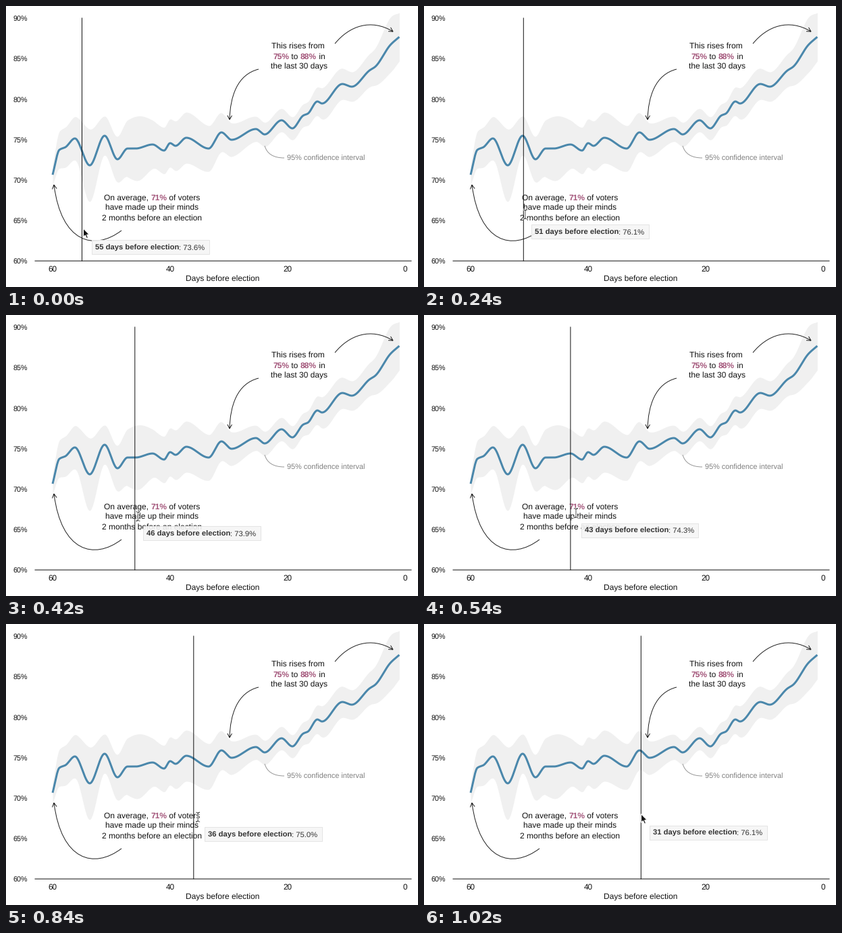
Animation of 610 by 418 pixels, one loop 1.15 s. Source, as a matplotlib script:

```python
import matplotlib.pyplot as plt
import numpy as np
from matplotlib.animation import FuncAnimation
from matplotlib.patches import PathPatch, Polygon, Rectangle
from matplotlib.path import Path

W, H, DPI = 610, 418, 64
PT = 72 / DPI  # points per pixel
LOOP, TICK, STEP, LAST = 1150, 10, 60, 17

INK, BLUE, PLUM, GREY = "#111111", "#4a87ab", "#a3557a", "#808080"

plt.rcParams.update({
    "font.family": "Liberation Sans",
    "text.hinting": "none",
    "toolbar": "None",
})

fig = plt.figure(figsize=(W / DPI, H / DPI), dpi=DPI, facecolor="white")
ax = fig.add_axes([0, 0, 1, 1])
ax.set(xlim=(0, W), ylim=(H, 0))
ax.axis("off")


def day_x(day):
    return 69 + (60 - day) * 8.7


def x_day(x):
    return round(60 - (x - 69) / 8.7)


def pct_y(pct):
    return 379.5 - (pct - 60) * 12.03


def smooth(points, u):
    """Monotone cubic through the points: flat at every turning point."""
    x, y = np.array(points, float).T
    h = np.diff(x)
    d = np.diff(y) / h
    prod = d[:-1] * d[1:]
    inner = np.divide(2 * prod, d[:-1] + d[1:], out=np.zeros_like(prod), where=prod > 0)
    m = np.concatenate([d[:1], inner, d[-1:]])
    i = np.clip(np.searchsorted(x, u, side="right") - 1, 0, len(h) - 1)
    t, h = (u - x[i]) / h[i], h[i]
    return ((1 + 2 * t) * (1 - t) ** 2 * y[i] + t * (1 - t) ** 2 * h * m[i]
            + t * t * (3 - 2 * t) * y[i + 1] + t * t * (t - 1) * h * m[i + 1])


def text(x, y, s, size=12, color=INK, weight="normal", ha="left", z=6):
    return ax.text(x, y, s, fontsize=size * PT, color=color, weight=weight,
                   ha=ha, va="baseline", zorder=z)


def chain(parts, x):
    """Set the parts one after another from x; return the end."""
    for part in parts:
        part.set_x(x)
        x += part.get_window_extent().width
    return x


def rich(cx, y, *parts):
    """Centred line; parts ending in % are highlighted."""
    items = [text(0, y, p, color=PLUM, weight="bold") if p.endswith("%")
             else text(0, y, p) for p in parts]
    chain(items, cx - chain(items, 0) / 2)


def stroke(points, color="#222222", head=0):
    codes = [Path.MOVETO] + [Path.CURVE4 if len(points) == 4 else Path.CURVE3] * (len(points) - 1)
    verts = list(points)
    if head:
        tip = np.array(points[-1], float)
        back = np.array(points[-2], float) - tip
        a = np.arctan2(back[1], back[0])
        wings = [tip + head * np.array([np.cos(a + s), np.sin(a + s)]) for s in (-0.5, 0.5)]
        verts += [wings[0], tip, wings[1]]
        codes += [Path.MOVETO, Path.LINETO, Path.LINETO]
    ax.add_patch(PathPatch(Path(verts, codes), fc="none", ec=color, lw=PT, zorder=5))


# Average line by its turning points, with a symmetric confidence band
turns = [(69, 251), (79, 214), (88, 210), (102, 197), (124, 237), (146, 193),
         (165, 228), (180, 212), (192, 212), (217, 206), (234, 215), (243, 204),
         (251, 208), (267, 196), (300, 212), (319, 188), (334, 199), (370, 183),
         (383, 191), (408, 170), (424, 182), (440, 163), (447, 160), (461, 142),
         (468, 145), (498, 116), (512, 120), (538, 96), (547, 90), (569, 58), (582.3, 46)]
margin = [(69, 15), (80, 28), (104, 33), (123, 54), (146, 29), (165, 34), (195, 48),
          (224, 34), (265, 38), (300, 34), (334, 25), (380, 18), (440, 17),
          (480, 25), (512, 22), (540, 25), (570, 41), (582.3, 36)]
xs = np.linspace(69, 582.3, 700)
mean, half = smooth(turns, xs), smooth(margin, xs)
ax.fill_between(xs, mean - half, mean + half, color="#f0f0f0", lw=0, zorder=1)
ax.plot(xs, mean, color=BLUE, lw=3 * PT, solid_capstyle="butt", zorder=3)

# Axes
ax.plot([43, 600], [379.2, 379.2], color=INK, lw=PT, snap=False, zorder=2)
for p in range(60, 91, 5):
    text(32, pct_y(p) + 3.5, f"{p}%", 10.8, ha="right")
for d in range(0, 61, 20):
    text(day_x(d), 395, str(d), 11.8, ha="center")
text(321, 410, "Days before election", ha="center")

# Notes
rich(434, 63, "This rises from ")
rich(434, 79, "75%", " to ", "88%", " in")
rich(434, 94, "the last 30 days")
rich(216, 289, "On average, ", "71%", " of voters")
rich(216, 304, "have made up their minds")
rich(216, 319, "2 months before an election")
text(416.5, 229.5, "95% confidence interval", 10.9, GREY)
stroke([(487, 56), (508, 30), (540, 18), (573, 38)], head=7)
stroke([(374, 94), (342, 102), (332, 135), (331, 169)], head=7)
stroke([(171, 334), (130, 365), (82, 352), (71, 266)], head=7)
stroke([(383, 208), (388, 226), (412, 226)], "#999999")

# Hover rule, tooltip and pointer
shares = [73.6, 71.5, 72.0, 74.8, 76.1, 74.0, 73.9, 73.9, 74.0,
          74.3, 74.4, 75.2, 74.0, 75.3, 75.0, 73.9, 73.9, 76.1]

rule, = ax.plot([0, 0], [18, 379], color=INK, lw=PT, snap=False, zorder=7)
box = Rectangle((0, 0), 172, 21, fc=(0.96, 0.96, 0.96, 0.9), ec="#e4e4e4", lw=PT, zorder=8)
ax.add_patch(box)
tip = [text(0, 0, "", 11.3, "#333333", w, z=9) for w in ("bold", "normal")]

ARROW = np.array([(0, 0), (0, 12.5), (2.8, 9.9), (5, 14.6), (7, 13.7), (5, 9.2), (8.8, 9)])
arrow = Polygon(ARROW, fc="#111111", ec="white", lw=PT, zorder=11)
ax.add_patch(arrow)
BEAM = np.array([(-2.5, -7), (0, -6), (2.5, -7), (0, -6), (0, 6), (-2.5, 7), (0, 6), (2.5, 7)])
beam = [ax.plot([], [], color=c, lw=w * PT, alpha=a, zorder=z)[0]
        for c, w, a, z in (("white", 2.8, 0.8, 10), ("#555555", 1, 1, 11))]


def update(i):
    k = min(i * TICK // STEP, LAST)
    x = np.interp(k, [0, 4, 9, 11, LAST], [112.5, 144.5, 218, 239.5, 319.5])
    y = 295 + 53 * np.exp(-k / 7)
    day = x_day(x)
    rule.set_xdata([day_x(day)] * 2)

    tip[0].set_text(f"{day} days before election")
    tip[1].set_text(f": {shares[k]:.1f}%")
    for part in tip:
        part.set_y(y + 14.5)
    left = x + 14.5
    end = chain(tip, left + 5)
    box.set_bounds(left, y, end + 6 - left, 21)

    # The pointer runs ahead of the tooltip while it moves
    px = x + 2 + 5 * np.sin(np.pi * k / LAST)
    on_text = 143 < px < 290
    arrow.set_visible(not on_text)
    arrow.set_xy(ARROW + (px, y - 17))
    for line in beam:
        line.set_visible(on_text)
        line.set_data(*(BEAM + (px, y - 15)).T)
    return [rule, box, *tip, arrow, *beam]


anim = FuncAnimation(fig, update, frames=LOOP // TICK, interval=TICK,
                     repeat=True, repeat_delay=0, cache_frame_data=False)
plt.show()
```
